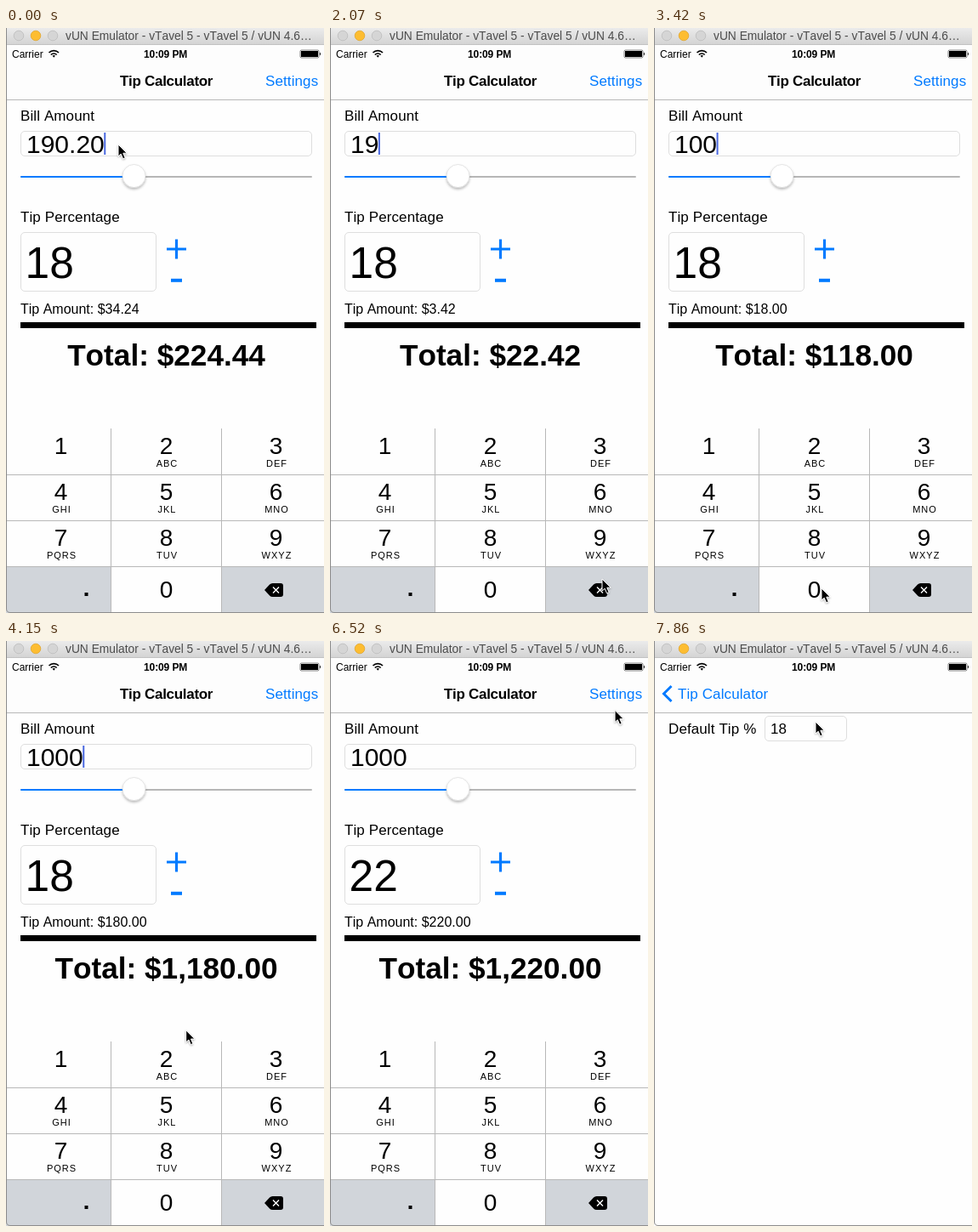
Animation, 374 px wide and 688 px high, one loop 8 s. Source, as an HTML page:

```html
<!DOCTYPE html>
<html lang="en">
<head>
<meta charset="utf-8">
<title>Tip Calculator</title>
<style>
  html, body { margin: 0; width: 100%; height: 100%; overflow: hidden; background: #fefefe; }
  svg { display: block; width: 374px; height: 688px; }
  text { font-family: "Liberation Sans", Arial, sans-serif; font-size: 17px; font-kerning: none; white-space: pre; }
  .label { letter-spacing: .1px; }
  .blue { fill: #007aff; }
  .title { font-weight: bold; letter-spacing: -.3px; }
  .small { font-size: 12px; }
  .bill { font-size: 30px; }
  .tip { font-size: 51.5px; }
  .total { font-size: 35.2px; font-weight: bold; text-anchor: middle; }
  .digit { font-size: 28px; text-anchor: middle; }
  .letters { font-size: 11px; letter-spacing: 1px; text-anchor: middle; }
  .field { fill: #fefefe; stroke: #dedede; }
  .rule { stroke: #b8b8b8; }
</style>
</head>
<body>
<svg viewBox="0 0 374 688">
  <defs>
    <linearGradient id="chrome" x2="0" y2="1">
      <stop stop-color="#ebebeb"/><stop offset="1" stop-color="#d3d3d3"/>
    </linearGradient>
    <filter id="soft" x="-30%" y="-30%" width="160%" height="180%">
      <feDropShadow dx="0" dy="2" stdDeviation="1.6" flood-opacity=".28"/>
    </filter>
    <filter id="drop" x="-50%" y="-30%" width="200%" height="180%">
      <feDropShadow dx="0" dy="1" stdDeviation=".8" flood-opacity=".35"/>
    </filter>
  </defs>
  <rect width="374" height="688" fill="#fefefe"/>

  <g id="calc">
    <text class="label" x="17" y="108.500">Bill Amount</text>
    <rect class="field" x="17.5" y="121.5" width="342" height="29" rx="4.5"/>
    <text class="bill" id="bill" x="24" y="146.500"></text>
    <rect id="caret" y="123" width="2" height="26" fill="#4a68e0"/>
    <rect x="17" y="174" width="343" height="2" rx="1" fill="#b6b6b6"/>
    <rect x="17" y="174" width="134" height="2" rx="1" fill="#007aff"/>
    <circle cx="150.5" cy="174" r="13.5" fill="#fff" stroke="#d4d4d4" stroke-width=".6" filter="url(#soft)"/>

    <text class="label" x="17" y="227.500">Tip Percentage</text>
    <rect class="field" x="17.5" y="240.5" width="159" height="69" rx="4.5"/>
    <text class="tip" id="tip" x="22.5" y="293.500"></text>
    <path id="plus" d="M189 260H212M200.5 248.5V271.5" stroke="#007aff" stroke-width="3.2"/>
    <path d="M194 296.8H207" stroke="#007aff" stroke-width="4"/>

    <text id="amount" x="17" y="335.500" style="font-size:16px"></text>
    <rect x="17" y="346" width="348" height="7"/>
    <text class="total" id="total" x="188.5" y="397.300"></text>
  </g>

  <g id="prefs">
    <rect y="85" width="374" height="603" fill="#fefefe"/>
    <text class="label" x="17" y="108.500">Default Tip %</text>
    <rect class="field" x="130.5" y="88.5" width="96" height="29" rx="4.5"/>
    <text x="137" y="108.500">18</text>
  </g>

  <g id="pad">
    <rect y="471" width="374" height="217" fill="#fefefe"/>
    <rect y="633" width="123" height="55" fill="#d1d5da"/>
    <rect id="zero" x="124" y="633" width="129" height="55" fill="#d1d5da"/>
    <rect id="del" x="254" y="633" width="120" height="55"/>
    <path class="rule" d="M0 525.5H374M0 579.5H374M0 633.5H374M123.5 471V688M253.5 471V688"/>
    <g id="keys"></g>
    <rect x="92.5" y="664" width="4" height="4"/>
    <path d="M304 661L310 654.5Q311.500 653 313.500 653H323Q326 653 326 656V666Q326 669 323 669H313.500Q311.500 669 310 667.500Z"/>
    <path d="M314 657.500L321 664.500M321 657.500L314 664.500" stroke="#fff" stroke-width="1.4"/>
  </g>

  <rect y="20" width="374" height="64" fill="#fdfdfd"/>
  <path class="rule" d="M0 84.500H374"/>
  <text class="small" x="7" y="34.500">Carrier</text>
  <g fill="none" stroke="#000" stroke-width="1.700">
    <path d="M50.500 29A8 8 0 0 1 62 29M52.800 31.500A5 5 0 0 1 59.700 31.500"/>
    <path d="M54.500 32.600L56.250 34.800L58 32.600Q56.250 31.300 54.500 32.600Z" fill="#000" stroke="none"/>
  </g>
  <text class="small" x="162" y="34.500" style="font-weight:bold;letter-spacing:-.1px">10:09 PM</text>
  <rect x="346" y="26" width="22" height="9" rx="1.500" fill="none" stroke="#000" stroke-width=".5"/>
  <rect x="347" y="27" width="20" height="7"/>
  <path d="M369 28.500Q371 30.500 369 32.500Z"/>

  <text class="title" id="heading" x="134" y="68">Tip Calculator</text>
  <text class="label blue" id="settings" x="305" y="68">Settings</text>
  <g id="back">
    <path id="chevron" d="M20.500 53L11.500 62L20.500 71" fill="none" stroke="#007aff" stroke-width="3"/>
    <text class="label blue" id="backText" y="68">Tip Calculator</text>
  </g>

  <rect width="374" height="20" fill="url(#chrome)"/>
  <path d="M0 19.500H374" stroke="#c2c2c2"/>
  <g stroke-width=".8">
    <circle cx="15" cy="9" r="5.800" fill="#d5d5d5" stroke="#bdbdbd"/>
    <circle cx="35" cy="9" r="5.800" fill="#fdbd31" stroke="#e0a62f"/>
    <circle cx="55" cy="9" r="5.800" fill="#d5d5d5" stroke="#bdbdbd"/>
  </g>
  <text x="70" y="14" fill="#4c4c4c" style="font-size:13.8px">vUN Emulator - vTavel 5 - vTavel 5 / vUN 4.6…</text>
  <path d="M.5 0V683Q.5 687.500 5 687.500H374" fill="none" stroke="#8c8c8c"/>

  <path id="pointer" d="M0 0V14L3.200 11.200L5.600 16.800L8.200 15.700L5.800 10.200H10.200Z" stroke="#fff" stroke-width="1" filter="url(#drop)"/>
</svg>
<script>
const LOOP = 8000, TICK = LOOP / 54;
const el = id => document.getElementById(id);

// time, bill, tip percentage
const entries = [
  [0, "190.20", 18], [1320, "190.2", 18], [1620, "190.", 18], [1770, "190", 18],
  [1920, "19", 18], [2220, "1", 18], [3120, "10", 18], [3420, "100", 18],
  [3710, "1000", 18], [4750, "1000", 19], [5190, "1000", 20],
  [5630, "1000", 21], [5930, "1000", 22]
];
// time, x, y
const route = [
  [0, 132, 137], [100, 132, 137], [500, 232, 320], [850, 340, 560], [1050, 362, 658],
  [1200, 320, 648], [2400, 320, 648], [2530, 296, 652], [2970, 197, 659],
  [3760, 197, 659], [4200, 213, 440], [4600, 208, 252], [5980, 208, 252],
  [6300, 290, 150], [6530, 335, 82], [6680, 337, 64], [7250, 337, 64],
  [7860, 190, 95], [LOOP, 190, 95]
];
const delDown = [[1320, 1620], [1770, 2070], [2220, 2370]];
const zeroDown = [[2970, 3120], [3270, 3420], [3570, 3710]];
const plusDown = [[4750, 4900], [5190, 5340], [5630, 5780], [5930, 6080]];

const within = (spans, t) => spans.some(([a, b]) => t >= a && t < b);
const clamp = v => Math.min(1, Math.max(0, v));
const mix = (a, b, k) => a + (b - a) * k;
const ease = k => k * k * (3 - 2 * k);
const shift = (id, x, y = 0) => el(id).setAttribute("transform", `translate(${x} ${y})`);
const money = v => "$" + v.toLocaleString("en-US", { minimumFractionDigits: 2, maximumFractionDigits: 2 });

const letters = ["", "ABC", "DEF", "GHI", "JKL", "MNO", "PQRS", "TUV", "WXYZ"];
const columns = [64.5, 188.5, 317.5];
el("keys").innerHTML = letters.map((word, i) => {
  const x = columns[i % 3], y = 500.5 + 54 * Math.floor(i / 3);
  return `<text class="digit" x="${x}" y="${y}">${i + 1}</text>
    <text class="letters" x="${x + 1}" y="${y + 15.5}">${word}</text>`;
}).join("") + '<text class="digit" x="188.5" y="670">0</text>';

function pointerAt(t) {
  const i = Math.max(1, route.findIndex(p => p[0] >= t));
  const [t0, x0, y0] = route[i - 1], [t1, x1, y1] = route[i];
  const k = clamp((t - t0) / (t1 - t0));
  return [mix(x0, x1, k), mix(y0, y1, k)];
}

function draw(time) {
  const t = Math.floor(time / TICK + 0.11) * TICK + 16;
  const [since, bill, tip] = entries.filter(e => e[0] <= t).pop();
  const sum = parseFloat(bill), extra = sum * tip / 100;
  el("bill").textContent = bill;
  el("tip").textContent = tip;
  el("amount").textContent = "Tip Amount: " + money(extra);
  el("total").textContent = "Total: " + money(sum + extra);

  // The caret restarts its blink on each key press.
  const typed = Math.min(since, 3710);
  el("caret").setAttribute("x", 23.5 + el("bill").getComputedTextLength());
  el("caret").setAttribute("opacity", (t - typed) % 1000 < 480 ? 1 : 0);

  el("del").setAttribute("fill", within(delDown, t) ? "#fefefe" : "#d1d5da");
  el("zero").setAttribute("opacity", within(zeroDown, t) ? 1 : 0);
  el("plus").setAttribute("opacity", within(plusDown, t) ? 0.5 : 1);

  const push = ease(clamp((t - 6900) / 560));
  shift("calc", -112 * push);
  shift("pad", -374 * push);
  shift("prefs", 374 * (1 - push));
  el("heading").setAttribute("x", mix(134, 28, push));
  el("heading").setAttribute("opacity", clamp(1 - push * 1.6));
  el("settings").setAttribute("opacity", clamp(1 - push * 1.8));
  el("backText").setAttribute("x", mix(134, 28, push));
  el("back").setAttribute("opacity", push);

  shift("pointer", ...pointerAt(t));
}

function frame(now) {
  draw(now % LOOP);
  requestAnimationFrame(frame);
}
draw(0);
requestAnimationFrame(frame);
</script>
</body>
</html>
```
